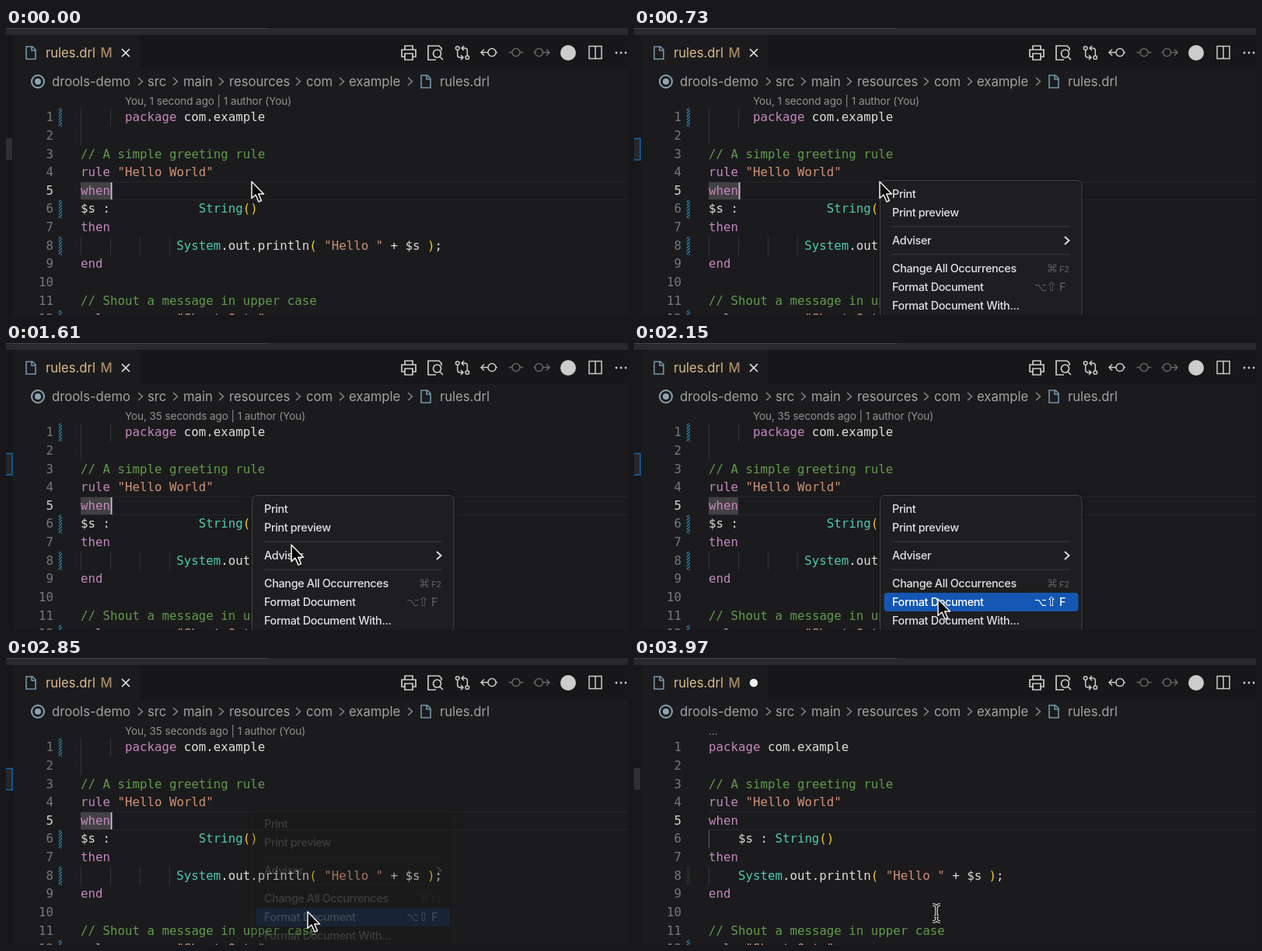
Write an HTML page with a canvas that moves like this. It is 800x370 px and loops after 4000 ms.

```html
<!DOCTYPE html>
<html lang="en">
<head>
<meta charset="utf-8">
<title>Format a rule file</title>
<style>
  html, body { margin: 0; width: 100%; height: 100%; overflow: hidden; background: #1b1b1d; }
  canvas { display: block; }
</style>
</head>
<body>
<canvas id="stage" width="800" height="370"></canvas>
<script>
const g = document.getElementById('stage').getContext('2d');
const LOOP = 4000, MENU_IN = 580, FADE = 2740, MENU_OUT = 2875, FORMAT = 3000;
const CHAR = 9.49, LEFT = 96, ROW = 23.65;
const MONO = '15.77px "DejaVu Sans Mono", monospace';
const EDITOR = '#1b1b1d', CHROME = '#171719', LINE = '#272729', ICON = '#cccccc';
const COLOR = { k: '#c586c0', s: '#ce9178', c: '#619b4b', t: '#4ec9b0', p: '#f5c92c', w: '#dedede' };

// Each token is a colour key, a colon and its text.
const println = ['t:System', 'w:.out.println', 'p:(', 's: "Hello "', 'w: + $s ', 'p:)', 'w:;'];
const messy = [
  [6, 'k:package', 'w: com.example'], [0], [0, 'c:// A simple greeting rule'],
  [0, 'k:rule', 's: "Hello World"'], [0, 'k:when'],
  [0, 'w:$s :            ', 't:String', 'p:()'], [0, 'k:then'], [13, ...println],
  [0, 'k:end'], [0], [0, 'c:// Shout a message in upper case'], [0, 'k:rule', 's:         "Shout Outs"']
];
const tidy = messy.slice();
tidy[0] = [0, ...messy[0].slice(1)];
tidy[5] = [4, 'w:$s : ', 't:String', 'p:()'];
tidy[7] = [4, ...println];
tidy[11] = [0, 'k:rule', 's: "Shout Outs"'];

const rowY = i => 115 + ROW * i;

function rect(x, y, w, h, color) {
  g.fillStyle = color;
  g.fillRect(x, y, w, h);
}

function text(str, x, y, color, font, spacing = 0, align = 'left') {
  g.font = font;
  g.letterSpacing = spacing + 'px';
  g.textAlign = align;
  g.fillStyle = color;
  g.fillText(str, x, y);
}
const ui = (str, x, y, color, weight = 400) =>
  text(str, x, y, color, weight + ' 16.7px Inter, sans-serif', -0.03);

function stroke(d, x, y, color = ICON, width = 1.5) {
  g.save();
  g.translate(x, y);
  g.strokeStyle = color;
  g.lineWidth = width;
  g.stroke(new Path2D(d));
  g.restore();
}

function disc(x, y, r, color) {
  g.fillStyle = color;
  g.beginPath();
  g.arc(x, y, r, 0, 7);
  g.fill();
}

const ring = r => `M${r} 0A${r} ${r} 0 1 1 ${-r} 0A${r} ${r} 0 1 1 ${r} 0`;
const chevron = (x, y, color, width = 1.4) => stroke('M-3-5L2.5 0L-3 5', x, y, color, width);
const fileIcon = (x, y) => stroke('M-6-8H2L6-4V8H-6ZM1-8V-3H6', x, y, '#7397ab', 1.6);

function toolbar() {
  stroke('M-5-4V-9H5V-4M-5 5H-9V-4H9V5H5M-5 1H5V9H-5Z', 518, 32, ICON, 1.7);
  stroke('M1 9H-9V-9H5L8-6V-3M7.5 1A5 5 0 1 1-2.5 1A5 5 0 1 1 7.5 1M6 5L10 9', 552, 32, ICON, 1.7);
  stroke('M-4-6A2.3 2.3 0 1 1-8.6-6A2.3 2.3 0 1 1-4-6M8.6 6A2.3 2.3 0 1 1 4 6A2.3 2.3 0 1 1 8.6 6' +
    'M-6.3-3.5V3Q-6.3 6-3 6H1M-2 3L1 6L-2 9M6.3 3.5V-3Q6.3-6 3-6H-1M2-9L-1-6L2-3', 587, 32);
  stroke(ring(5), 625, 31.5);
  stroke('M-1 0H-10M-6-4L-10 0L-6 4M9 0H11', 621, 31.5);
  stroke(ring(5) + 'M-9.5 0H-5M5 0H9.5', 656, 31.5, '#666667');
  stroke(ring(5), 685.5, 31.5, '#666667');
  stroke('M1.5 0H10M6-4L10 0L6 4M-10.5 0H-8.5', 689, 31.5, '#666667');
  disc(723, 32, 10, ICON);
  stroke('M-8-8H8V8H-8ZM0-8V8', 758, 31.5);
  for (const x of [785, 791, 797]) disc(x, 32, 1.4, ICON);
}

function chrome(focusLost, dirty) {
  rect(0, 0, 800, 370, EDITOR);
  rect(9, 9, 791, 44, CHROME);
  rect(0, 0, 800, 9, '#2a2a2c');
  rect(0, 0, 338, 1, '#434345');
  rect(0, 9, 9, 361, CHROME);
  rect(9, 9, 163, 45, EDITOR);
  rect(0, 142, 8, 28, focusLost ? '#25272c' : '#303034');
  if (focusLost) stroke('M0 .5H8V28H0', 0, 142, '#1767ad', 1.5);

  fileIcon(32, 32);
  ui('rules.drl', 51, 38, '#dcbb8b');
  ui('M', 121.5, 38, '#a58a62', 500);
  if (dirty) disc(154, 32, 5.2, '#f0f0f0');
  else stroke('M-5-5L5 5M5-5L-5 5', 154, 32, '#e8e8e8', 1.6);
  toolbar();

  stroke(ring(8), 41, 69, '#8aa5b5', 2);
  disc(41, 69, 4, '#8aa5b5');
  const path = { 'drools-demo': 59, src: 182, main: 228, resources: 287, com: 386, example: 441, 'rules.drl': 558 };
  for (const name in path) ui(name, path[name], 75, '#a2a2a3');
  for (const x of [173, 218, 277, 376, 432, 520]) chevron(x, 69, '#8e8e8f');
  fileIcon(540, 69);
}

function hatch(row, color = '#2384ad', alpha = 1) {
  const y = rowY(row) - 11.5;
  g.save();
  g.globalAlpha = alpha;
  g.beginPath();
  g.rect(67.5, y, 4.5, ROW);
  g.clip();
  for (let d = -1; d < 30; d += 4) stroke('M0 0L5-5', 67.5, y + d, color, 1.4);
  g.restore();
}

function guides(row, cols, color = '#363637') {
  for (const c of cols) rect(LEFT + c * CHAR, rowY(row) - 11.5, 1, ROW, color);
}

function lens(t) {
  const age = t < 1150 ? '1 second' : '35 seconds';
  const label = t < 3600 ? `You, ${age} ago | 1 author (You)` : '…';
  text(label, t < FORMAT ? 153 : LEFT, 99, '#929293', '13.6px Inter, sans-serif', -0.11);
}

function code(t) {
  const done = t >= FORMAT;
  lens(t);
  rect(LEFT, 198, 704, 1, LINE);
  rect(LEFT, 221, 704, 1, LINE);
  if (!done) rect(LEFT, 199, 38, 22, '#434144');

  if (done) {
    guides(5, [0], '#626263');
    guides(7, [0]);
  } else {
    guides(0, [0, 4]);
    guides(1, [0]);
    guides(7, [0, 4, 8, 12]);
  }

  (done ? tidy : messy).forEach(([indent, ...tokens], i) => {
    const y = rowY(i) + 5.2;
    text(i + 1, 61, y, i === 4 ? '#d4d4d4' : '#74787e', MONO, 0, 'right');
    let col = indent;
    for (const token of tokens) {
      const str = token.slice(2);
      text(str, LEFT + col * CHAR, y, COLOR[token[0]], MONO);
      col += str.length;
    }
  });

  if (t < 3700) [0, 5].forEach(row => hatch(row));
  if (t < 3850) hatch(7);
  else hatch(7, '#3a8a62', 0.45 * (LOOP + 30 - t) / 100);
  hatch(11);

  const caretOn = t < 3050 ? (t + 450) % 1000 < 500 : t < 3550;
  if (caretOn) rect(134.5, 199, 2, 22, '#c4c4c4');
}

const items = [['Print', 214], ['Print preview', 238], ['Adviser', 274],
  ['Change All Occurrences', 310], ['Format Document', 334], ['Format Document With...', 358]];

function menu(t, pointerY) {
  if (t < MENU_IN || t >= MENU_OUT) return;
  g.save();
  g.globalAlpha = Math.min(1, (MENU_OUT - t) / (MENU_OUT - FADE));
  g.beginPath();
  g.roundRect(316.5, 196.5, 259.5, 200, 6);
  g.shadowColor = '#0006';
  g.shadowBlur = 6;
  g.fillStyle = '#1e1d20';
  g.fill();
  g.shadowColor = 'transparent';
  g.strokeStyle = '#464548';
  g.lineWidth = 1;
  g.stroke();
  rect(332, 255.5, 229, 1, '#414043');
  rect(332, 291.5, 229, 1, '#414043');

  const blink = t > 2600 && t < 2670;
  let active;
  for (const [name, y] of items) {
    const on = t > 1000 && !blink && Math.abs(pointerY - y) < 12;
    if (on) {
      active = name;
      g.beginPath();
      g.roundRect(321.5, y - 12, 250, 24, 4);
      g.fillStyle = '#1457b2';
      g.fill();
    }
    text(name, 332, y + 5.4, on ? '#ffffff' : '#e0e0e2', '500 14.4px Inter, sans-serif', -0.35);
  }
  chevron(557, 274, '#e0e0e2', 1.9);
  const hint = name => active === name ? '#ffffff' : '#5b5b5d';
  text('⌘', 531, 315, hint(items[3][0]), '14px "DejaVu Sans", sans-serif');
  text('F2', 547, 315, hint(items[3][0]), '500 11px Inter, sans-serif', -0.2);
  text('⌥', 515, 339.4, hint(items[4][0]), '14px "DejaVu Sans", sans-serif');
  text('⇧', 530, 339.4, hint(items[4][0]), '16px "DejaVu Sans", sans-serif');
  text('F', 547, 339.4, hint(items[4][0]), '500 14.4px Inter, sans-serif');
  g.restore();
}

// Time, x and y of the pointer's resting and passing points.
const route = [[0, 316, 198], [1150, 316, 198], [1610, 367, 260], [2080, 391, 330],
  [2400, 391, 330], [2700, 388, 327], [LOOP, 388, 327]];

function pointerAt(t) {
  const i = route.findIndex(p => p[0] > t);
  const [t0, x0, y0] = route[i - 1], [t1, x1, y1] = route[i];
  let u = (t - t0) / (t1 - t0);
  if (i === 2) u = u * u * (2 - u);
  if (i === 3) u = 1 - (1 - u) ** 2 * (1 + u);
  return [x0 + (x1 - x0) * u, y0 + (y1 - y0) * u];
}

function pointer(t, x, y) {
  if (t >= MENU_OUT + 25) {
    const beam = 'M-5-11Q0-11 0-7V7Q0 11-5 11M5-11Q0-11 0-7M0 7Q0 11 5 11M-3 4H3';
    stroke(beam, 389, 329, '#e8e8e8', 3.6);
    stroke(beam, 389, 329, '#111111', 1.4);
    return;
  }
  const arrow = new Path2D('M0 0V21.5L5 17L9 26L12.5 24.5L8.7 16H15.5Z');
  g.save();
  g.translate(x, y);
  g.lineJoin = 'round';
  g.lineWidth = 1.5;
  g.strokeStyle = '#f4f4f4';
  g.fillStyle = '#080808';
  g.fill(arrow);
  g.stroke(arrow);
  g.restore();
}

function draw(now) {
  const t = now % LOOP;
  const [x, y] = pointerAt(t);
  chrome(t >= MENU_IN && t < MENU_OUT + 25, t >= FORMAT);
  code(t);
  menu(t, y);
  pointer(t, x, y);
}

const start = performance.now();
function tick() {
  draw(performance.now() - start);
  requestAnimationFrame(tick);
}
tick();
</script>
</body>
</html>
```
